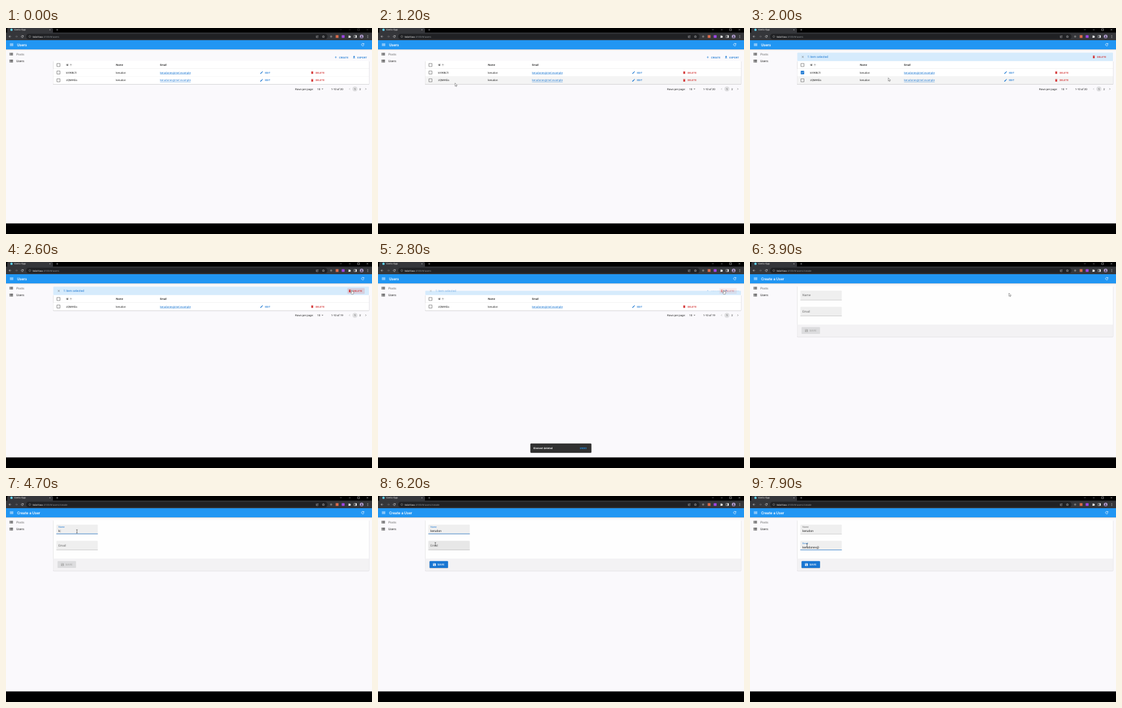
Recreate the animation shown at these times as an HTML page. Size 600 by 338 pixels, loop 8 s.

```html
<!DOCTYPE html>
<html lang="en">
<head>
<meta charset="utf-8">
<title>Users admin</title>
<style>
  html, body { margin: 0; width: 100%; height: 100%; overflow: hidden; background: #000; }
  svg { display: block; width: 100vw; height: 100vh; }
  text { font-family: Roboto, Arial, sans-serif; text-rendering: geometricPrecision; white-space: pre; }
  .medium { font-weight: 500; }
  .button { font-weight: 500; letter-spacing: .028em; }
  .url { font-family: "Open Sans", sans-serif; }
</style>
</head>
<body>
<svg id="stage" viewBox="0 0 600 338" preserveAspectRatio="none"></svg>
<script>
const LOOP = 8000, STEP = 100;
const BLUE = '#1976d2', RED = '#d32f2f', INK = '#212121', SOFT = '#666';
const NAME = 'kerudon', LOGIN = 'kerudonev@', MAIL = LOGIN + 'mel.example';
const IDS = ['kVWBLTI', 'zQMrKEa'];

// Icons on a 24-unit grid
const LINES = {
  menu: 'M3 7h18M3 12h18M3 17h18',
  add: 'M12 5v14M5 12h14',
  close: 'M6 6l12 12M18 6L6 18',
  minus: 'M5 13h14',
  up: 'M12 20V5M5 12l7-7 7 7',
  back: 'M20 12H5M12 5l-7 7 7 7',
  forward: 'M4 12h15M12 5l7 7-7 7',
  left: 'M14 6l-6 6 6 6',
  right: 'M10 6l6 6-6 6',
  down: 'M6 9l6 6 6-6',
  reload: 'M18 8A7 7 0 1 0 19 14M19 4v6h-6',
  box: 'M4 4h16v16H4z',
  info: 'M12 3a9 9 0 1 0 .1 0M12 11v6M12 7v2',
  star: 'M12 3l3 6 6 1-5 4 2 7-6-4-6 4 2-7-5-4 6-1z',
  share: 'M9 6H4v15h14v-5M8 16c0-6 4-8 11-8M15 4l5 4-5 4',
  check: 'M6 12l4 4 8-8'
};
const SOLIDS = {
  list: 'M3 5h4v4H3zM3 10h4v4H3zM3 15h4v4H3zM8 5h13v4H8zM8 10h13v4H8zM8 15h13v4H8z',
  get: 'M19 9h-4V3H9v6H5l7 7zM5 18v2h14v-2z',
  edit: 'M3 17.3V21h3.8L17.8 9.9l-3.7-3.7zM15 5l4 4 2.2-2.2-4-4z',
  trash: 'M6 7h12v14H6zM5 4h4l1-1h4l1 1h4v2H5z',
  save: 'M3 3h14l4 4v14H3zM5 5v4h10V5zM12 13a3 3 0 1 0 .1 0z',
  drop: 'M7 10l5 5 5-5z',
  puzzle: 'M3 6h6a3 3 0 1 1 6 0h5v5a3 3 0 1 1 0 6v4H3v-5a3 3 0 1 0 0-5z'
};

const clamp = v => Math.max(0, Math.min(1, v));
const smooth = v => v * v * (3 - 2 * v);
const ramp = (t, start, length = 200) => smooth(clamp((t - start) / length));
const mix = (a, b, p) => a + (b - a) * p;

const rect = (x, y, w, h, fill, r = 0, extra = '') =>
  `<rect x="${x}" y="${y}" width="${w}" height="${h}" rx="${r}" fill="${fill}" ${extra}/>`;
const circle = (x, y, r, fill) => `<circle cx="${x}" cy="${y}" r="${r}" fill="${fill}"/>`;
const text = (x, y, s, size, fill = INK, cls = '', extra = '') =>
  `<text x="${x}" y="${y}" font-size="${size}" fill="${fill}" class="${cls}" ${extra}>${s}</text>`;
const group = (body, opacity) => opacity > 0 ? `<g opacity="${opacity}">${body}</g>` : '';

function icon(name, cx, cy, size, color) {
  const place = `transform="translate(${cx - size / 2} ${cy - size / 2}) scale(${size / 24})"`;
  return LINES[name]
    ? `<path ${place} d="${LINES[name]}" fill="none" stroke="${color}" stroke-width="2.2"/>`
    : `<path ${place} d="${SOLIDS[name]}" fill="${color}" fill-rule="evenodd"/>`;
}

const iconButton = (name, label, x, y, color) =>
  icon(name, x, y, 5.8, color) + text(x + 5.4, y + 1.5, label, 4.06, color, 'button');

// Pointer path: time, x, y of the hot spot
const PATH = [
  [200, 520, -8], [500, 470, 60], [800, 330, 114], [1000, 200, 111], [1100, 140, 96],
  [1400, 87, 74], [1600, 86, 72.5], [1800, 86, 73], [2000, 226.7, 81.8], [2300, 548, 52],
  [2400, 567, 46], [2800, 567, 46], [3300, 555, 87], [3500, 549, 48], [3700, 549, 48],
  [4100, 300, 54], [4400, 116.3, 58], [6000, 116.3, 58], [6200, 94, 79], [6500, 93.5, 81]
];

function pointerAt(t) {
  const next = PATH.findIndex(p => p[0] > t);
  if (next === 0) return { x: -20, y: -20 };
  if (next < 0) { const [, x, y] = PATH[PATH.length - 1]; return { x, y }; }
  const [t0, x0, y0] = PATH[next - 1], [t1, x1, y1] = PATH[next];
  const p = smooth((t - t0) / (t1 - t0));
  return { x: mix(x0, x1, p), y: mix(y0, y1, p) };
}

const within = (t, a, b) => t >= a && t < b;

function pointer(t, { x, y }) {
  const at = `transform="translate(${x} ${y})"`;
  if (t >= 4400 || within(t, 3200, 3400))
    return `<path ${at} d="M-1.2-2.8Q0-2.8 0-2Q0-2.8 1.2-2.8M0-2V2M-1.2 2.8Q0 2.8 0 2Q0 2.8 1.2 2.8" fill="none" stroke="#222" stroke-width=".55"/>`;
  const hand = within(t, 1400, 1900) || within(t, 2400, 2900) || within(t, 3400, 3900);
  const shape = hand
    ? 'M-.5 .4Q0-.4.5.4V2.3L3 3V5L2.3 6.8H-.6L-2 4.4-1.6 3.6-.5 4.4z'
    : 'M0 0V5.2L1.2 4.1 2 5.9 2.8 5.5 2 3.8H3.7z';
  return `<path ${at} d="${shape}" fill="#fff" stroke="#222" stroke-width=".4"/>`;
}

function browser(t, creating) {
  const pale = '#d5d6d8', dim = '#85868a';
  const controls = ['down', 'minus', 'box', 'close']
    .map((name, i) => icon(name, [549, 563.5, 578, 592.5][i], 2.8, 4.6, '#fff')).join('');
  return rect(0, 0, 600, 20, '#000') + rect(2, 0, 75, 9, '#35363a', 2) + rect(0, 7.5, 600, 12.5, '#35363a') +
    circle(9, 2.9, 1.9, '#61dafb') + text(13.2, 4.4, 'Vanto App', 4, '#eee', 'url') +
    icon('close', 72, 3, 4, pale) + icon('add', 84, 3, 5, pale) +
    group(controls, t < 200 ? .4 : 1) +
    icon('back', 6.5, 14, 5.6, '#eee') + icon('forward', 17, 14, 5.6, dim) + icon('reload', 26.7, 14, 5.8, '#eee') +
    rect(33, 9.4, 494, 9.2, '#202124', 4.6) + icon('info', 39, 14, 4.6, '#aaa') +
    text(43.5, 15.6, `tidal-box<tspan fill="#9aa0a6">:4100/#/users${creating ? '/create' : ''}</tspan>`, 4.15, '#fff', 'url') +
    icon('share', 510.3, 14, 5, pale) + icon('star', 520.3, 14, 5, pale) +
    circle(533, 14, 1.8, '#777') + rect(540.5, 11.7, 4.6, 4.6, '#d86a4a') +
    rect(550.3, 11.7, 4.8, 4.6, '#9b45e0', .7) + icon('puzzle', 563, 14, 5, '#eee') +
    icon('box', 572.5, 14, 5.6, '#eee') + rect(573, 12, 1.9, 4, '#eee') +
    circle(583, 14, 3, '#b9a5d8') + circle(583, 13.2, 1, '#4a4058') + rect(581.3, 14.4, 3.4, 1.8, '#4a4058', .9) +
    [-1.8, 0, 1.8].map(d => circle(593, 14 + d, .5, '#eee')).join('');
}

function frame(creating) {
  return rect(0, 20, 600, 300.6, '#faf9fc') +
    rect(0, 35, 600, .8, '#000', 0, 'opacity=".16"') + rect(0, 35.8, 600, .9, '#000', 0, 'opacity=".06"') +
    rect(0, 20, 600, 15, '#2196f3') + icon('menu', 9.2, 27.4, 7.5, '#fff') +
    text(18.2, 29.5, creating ? 'Create a User' : 'Users', 6.25, '#fff', 'medium') +
    icon('reload', 584.8, 27.3, 7, '#fff') +
    icon('list', 8.6, 42.9, 7.5, '#666') + text(17, 44.6, 'Posts', 5, SOFT) +
    icon('list', 8.6, 54.2, 7.5, '#555') + text(17, 56, 'Users', 5, INK);
}

function checkbox(y, checked, hovered) {
  const halo = hovered ? circle(86, y, 5.9, 'rgba(25,118,210,.08)') : '';
  return halo + (checked
    ? rect(83.2, y - 2.8, 5.6, 5.6, BLUE, .6) + icon('check', 86, y, 7, '#fff')
    : icon('box', 86, y, 7.5, SOFT));
}

function row(id, top, t, mouse, checked) {
  const y = top + 6.2, base = y + 1.6;
  const hovered = mouse.y >= top && mouse.y < top + 12.5 && mouse.x > 77 && mouse.x < 595;
  return rect(77.5, top, 517.5, 12.6, hovered ? '#f4f4f4' : '#fff') +
    rect(77.5, top + 12.3, 517.5, .35, '#ddd') +
    checkbox(y, checked, hovered && mouse.x < 92) +
    text(98.5, base, id, 4.4) + text(180.2, base, NAME, 4.4, INK, '', 'letter-spacing=".05"') +
    text(252.5, base, MAIL, 4.4, BLUE, '', 'letter-spacing=".05" text-decoration="underline"') +
    iconButton('edit', 'EDIT', 419, y, BLUE) + iconButton('trash', 'DELETE', 502, y, RED);
}

function pagination(y, total) {
  const base = y + 1.5;
  return text(474, base, 'Rows per page:', 4.4) + text(510.3, base, '10', 4.4) + icon('drop', 518.8, y, 7, SOFT) +
    text(533, base, `1-10 of ${total}`, 4.4) + icon('left', 563.5, y, 5, '#888') +
    circle(572, y, 4, '#dedee0') + text(572, base, 1, 4.4, INK, '', 'text-anchor="middle"') +
    text(580.6, base, 2, 4.4, INK, '', 'text-anchor="middle"') + icon('right', 589.6, y, 5, INK);
}

function bulkBar(t) {
  const open = ramp(t, 1700) - ramp(t, 2700);
  if (open <= 0) return '';
  const height = 13.7 * open;
  const hover = within(t, 2400, 2900) ? rect(559.5, 42.7, 28.5, 9.6, 'rgba(211,47,47,.14)', 1.2) : '';
  return rect(77.5, 54.2 - height, 517.5, height, '#d6ebfc', 1) +
    group(hover + icon('close', 86.5, 47.4, 6.2, '#666') + text(94.2, 49.1, '1 item selected', 5, BLUE) +
      iconButton('trash', 'DELETE', 563.6, 47.4, RED), open);
}

function listPage(t, mouse) {
  const deleted = t >= 2500, selected = within(t, 1800, 2500);
  const ids = deleted ? IDS.slice(1) : IDS;
  const bottom = 66.9 + ids.length * 12.7;
  const hover = within(t, 3400, 3700) ? rect(535.5, 43, 30, 9.6, 'rgba(25,118,210,.06)', 1.2) : '';
  return hover + iconButton('add', 'CREATE', 540.6, 48, BLUE) + iconButton('get', 'EXPORT', 570.6, 48, BLUE) +
    rect(77.2, 54.4, 518.1, bottom - 53.7, '#000', 1, 'opacity=".25"') +
    rect(77.5, 54, 517.5, bottom - 54, '#fff', 1) + rect(77.5, 66.5, 517.5, .35, '#ddd') +
    checkbox(60.7, false, false) + text(98.5, 62.4, 'Id', 4.4, INK, 'medium') + icon('up', 106.3, 60.6, 5.4, SOFT) +
    text(180.2, 62.4, 'Name', 4.4, INK, 'medium') + text(252.5, 62.4, 'Email', 4.4, INK, 'medium') +
    ids.map((id, i) => row(id, 66.9 + i * 12.7, t, mouse, selected && i === 0)).join('') +
    pagination(bottom + 7.8, deleted ? 19 : 20) + bulkBar(t);
}

function field(y, label, value, focus, shrink, hovered, caret) {
  const fill = hovered ? 'rgba(0,0,0,.09)' : 'rgba(0,0,0,.06)';
  const line = 68 * focus;
  return `<path d="M82.5 ${y + 15.3}v-14q0-1.3 1.3-1.3h65.4q1.3 0 1.3 1.3v14z" fill="${fill}"/>` +
    rect(82.5, y + 15, 68, .35, '#888') +
    (line > 0 ? rect(116.5 - line / 2, y + 14.7, line, .7, BLUE) : '') +
    text(86, mix(y + 9.4, y + 5.2, shrink), label, mix(5, 3.75, shrink), focus > .5 ? BLUE : SOFT) +
    text(86, y + 12, `${value}${caret ? '<tspan font-weight="300">|</tspan>' : ''}`, 5);
}

function formPage(t, mouse) {
  const nameLength = t < 4700 ? 0 : t < 4900 ? 1 : Math.min(7, (t - 4900) / STEP + 2);
  const mailLength = t < 6900 ? 0 : Math.min(LOGIN.length, (t - 6900) / STEP + 1);
  const nameOn = ramp(t, 4400), mailOn = ramp(t, 6400);
  const ready = t >= 4800;
  const ink = ready ? '#fff' : '#aaa';
  return rect(77.2, 40, 518.1, 83.2, '#000', 1, 'opacity=".2"') + rect(77.5, 39.6, 517.5, 83, '#fefefe', 1) +
    rect(77.5, 102.6, 517.5, 20, '#f3f2f4') +
    field(47, 'Name', NAME.slice(0, nameLength), t < 6400 ? nameOn : 0, nameOn, within(t, 4300, 4500), within(t, 4600, 5300)) +
    field(73.5, 'Email', LOGIN.slice(0, mailLength), mailOn, mailOn, within(t, 6100, 6400), within(t, 6600, 6900)) +
    (ready ? rect(84.5, 107.3, 30.3, 11.4, '#000', 1.2, 'opacity=".22"') : '') +
    rect(84.5, 106.8, 30.3, 11.3, ready ? BLUE : '#dcdcde', 1.2) +
    icon('save', 92.5, 112.4, 6, ink) + text(97.6, 114, 'SAVE', 4.375, ink, 'button');
}

function snackbar(t) {
  return group(rect(249.6, 298.5, 100.6, 15.2, '#000', 1.3, 'opacity=".2"') +
    rect(249.8, 297.8, 100, 15.1, '#313131', 1.3) +
    text(254.8, 307, 'Element deleted', 4.375, '#fff', 'medium') +
    text(330.8, 306.9, 'UNDO', 4.06, '#2196f3', 'button'), ramp(t, 2600) - ramp(t, 3700));
}

const stage = document.getElementById('stage');
let shown = -1;

function draw() {
  const t = Math.floor(performance.now() % LOOP / STEP) * STEP;
  if (t !== shown) {
    shown = t;
    const creating = t >= 3700, mouse = pointerAt(t);
    stage.innerHTML = rect(0, 0, 600, 338, '#000') + frame(creating) +
      (creating ? formPage(t, mouse) : listPage(t, mouse)) +
      snackbar(t) + browser(t, creating) + pointer(t, mouse);
  }
  requestAnimationFrame(draw);
}
draw();
</script>
</body>
</html>
```
